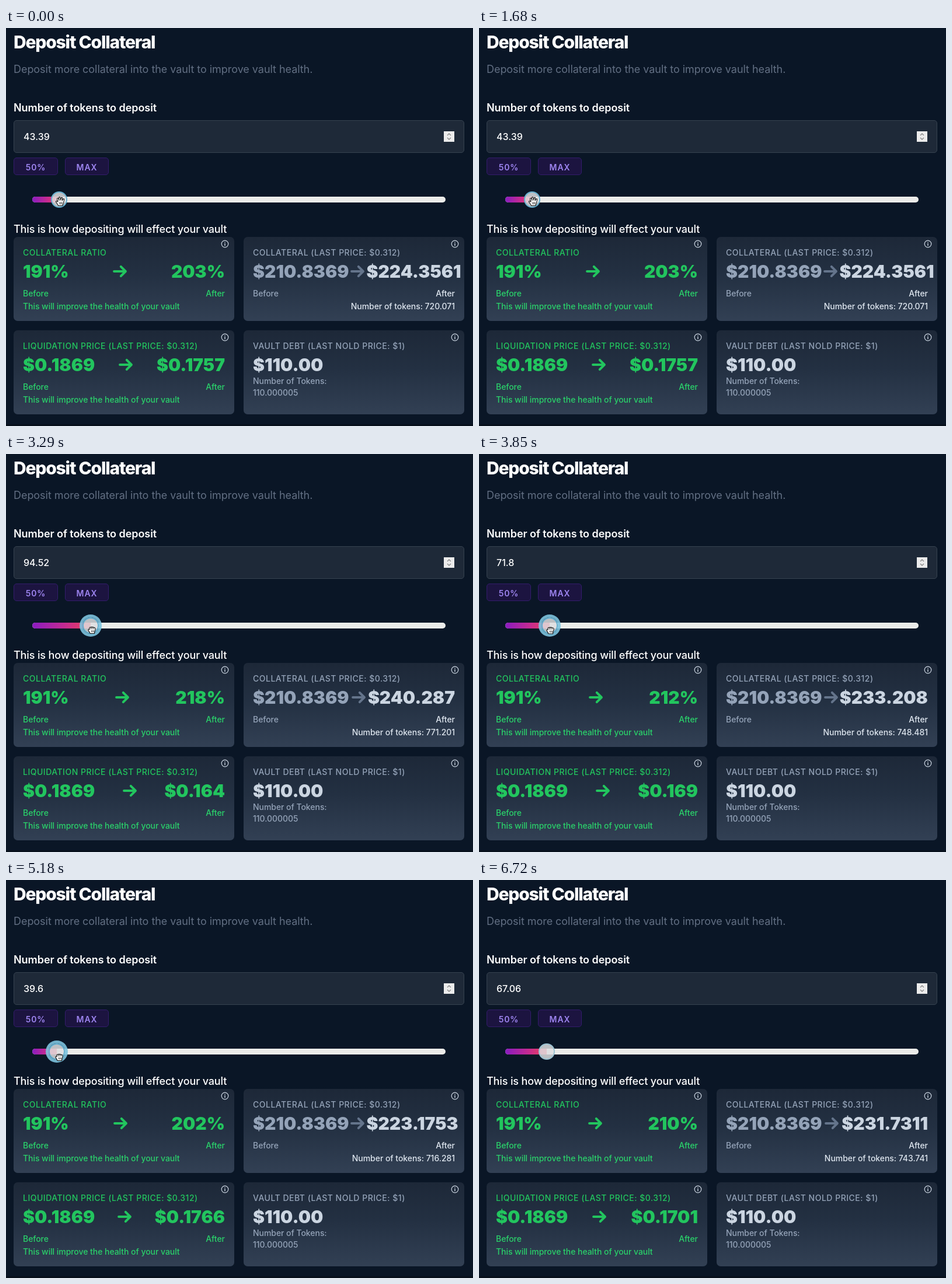
An HTML page for the animation above (6.79 s loop, 800 px wide and 682 px high).

```html
<!DOCTYPE html>
<html lang="en">
<head>
<meta charset="utf-8">
<title>Deposit Collateral</title>
<style>
html, body { margin: 0; width: 100%; height: 100%; overflow: hidden; background: #0a1626; }
#stage {
  position: relative; width: 800px; height: 682px; overflow: hidden; background: #0a1626;
  font-family: Inter, "Liberation Sans", sans-serif; font-optical-sizing: none;
  color: #fff; white-space: nowrap; cursor: default;
}
#stage::after { content: ""; position: absolute; left: 0; right: 0; bottom: 0; height: 3px; background: #07101c; }
.abs, .card > *, .thumb, .cursor { position: absolute; }
.abs { left: 13px; line-height: 28px; }
h1.abs { margin: 0; top: 9.5px; font-size: 30px; font-weight: 800; letter-spacing: -1.2px; }
.sub { top: 57px; font-size: 18px; letter-spacing: -.045px; color: #626f83; }
.label { font-size: 18px; font-weight: 500; letter-spacing: -.13px; }
.input {
  top: 158px; width: 772px; height: 56px; box-sizing: border-box; line-height: 54px; padding-left: 16px;
  background: #1e2938; border: 1px solid #36424f; border-radius: 5px; font-size: 16px; font-weight: 500;
}
.input svg { position: absolute; left: 736px; top: 18px; }
.btn {
  top: 222px; height: 30px; line-height: 31px; box-sizing: border-box; text-align: center;
  font-size: 14px; font-weight: 600; letter-spacing: .9px; color: #9f86f2;
  background: #1c1440; border: 1px solid #331c6c; border-radius: 5px;
}
.btn b { font-weight: inherit; position: relative; top: -.5px; }
.track { left: 45px; top: 289px; width: 708px; height: 10px; border-radius: 5px; background: #ebebe9; overflow: hidden; }
.fill { height: 100%; background: linear-gradient(90deg, #8a1cc0, #c42a92 55%, #ee4258); }
.thumb {
  top: 280px; left: -14px; width: 28px; height: 28px; box-sizing: border-box; border-radius: 50%;
  border: 2px solid #66b0d0; background: rgba(222, 222, 225, .85);
}
.thumb.held { box-shadow: 0 0 0 5px rgba(126, 196, 222, .9); }
.thumb.idle { border-color: #9cc3d2; }
.card {
  position: absolute; width: 378px; height: 144px; border-radius: 7px;
  background: linear-gradient(#1d2838, #233042 45%, #324054); color: #22c55e;
}
.card > * { line-height: 20px; font-size: 14px; font-weight: 500; letter-spacing: -.05px; left: 16px; }
.card .title { top: 17px; letter-spacing: .5px; }
.card .values {
  top: 44px; right: 16px; height: 30px; display: flex; justify-content: space-between; align-items: center;
  font-size: 30px; font-weight: 900; letter-spacing: 0;
}
.values > * { flex: none; }
.card .before { top: 87px; }
.card .after { top: 87px; left: auto; right: 16px; }
.card .note { top: 109px; }
.card .info { left: 355px; top: 5px; color: #cbd5e1; }
.green .before, .green .after, .green .note { color: #2ad06a; }
.gray { color: #94a3b8; }
.gray .arrow { color: #64748b; }
.gray .new { color: #cbd5e1; }
.gray .after { color: #dde5ee; }
.cursor { left: 0; top: 0; overflow: visible; }
</style>
</head>
<body>
<div id="stage">
  <h1 class="abs">Deposit Collateral</h1>
  <div class="abs sub">Deposit more collateral into the vault to improve vault health.</div>
  <div class="abs label" style="top:123px;font-weight:600;letter-spacing:-.06px">Number of tokens to deposit</div>
  <div class="abs input"><span id="amount"></span>
    <svg width="18" height="18" fill="none" stroke="#8a8a8a" stroke-width="1.4">
      <rect width="18" height="18" fill="#ececec" stroke="none"/>
      <path d="M6 7l3-3 3 3M6 11l3 3 3-3"/>
    </svg>
  </div>
  <div class="abs btn" style="width:76px"><b>50%</b></div>
  <div class="abs btn" style="left:101px;width:75px"><b>MAX</b></div>
  <div class="abs track"><div class="fill" id="fill"></div></div>
  <div class="thumb" id="thumb"></div>
  <div class="abs label" style="top:331px">This is how depositing will effect your vault</div>

  <div class="card green" style="left:13px;top:358px">
    <div class="title">COLLATERAL RATIO</div>
    <div class="values"><span>191%</span><i class="arrow"></i><span id="ratio"></span></div>
    <div class="before">Before</div><div class="after">After</div>
    <div class="note">This will improve the health of your vault</div>
  </div>
  <div class="card gray" style="left:407px;top:358px">
    <div class="title">COLLATERAL (LAST PRICE: $0.312)</div>
    <div class="values"><span>$210.8369</span><i class="arrow"></i><span class="new" id="worth"></span></div>
    <div class="before">Before</div><div class="after">After</div>
    <div class="after" style="top:109px">Number of tokens: <span id="tokens"></span></div>
  </div>
  <div class="card green" style="left:13px;top:518px">
    <div class="title">LIQUIDATION PRICE (LAST PRICE: $0.312)</div>
    <div class="values"><span>$0.1869</span><i class="arrow"></i><span id="liquid"></span></div>
    <div class="before">Before</div><div class="after">After</div>
    <div class="note">This will improve the health of your vault</div>
  </div>
  <div class="card gray" style="left:407px;top:518px">
    <div class="title">VAULT DEBT (LAST NOLD PRICE: $1)</div>
    <div class="values"><span class="new">$110.00</span></div>
    <div class="before" style="top:77px">Number of Tokens:</div>
    <div class="before" style="top:97px">110.000005</div>
  </div>

  <svg class="cursor" id="cursor" width="1" height="1" stroke-linejoin="round" stroke-linecap="round">
    <g id="open" fill="#fff" stroke="#111" stroke-width="1.1">
      <path d="M-3.5 7.5C-4 5-7 2.5-7.5.5C-7.5-1-5.5-1-4 1L-5.5-4C-5.5-6-3.5-6-3-4.5L-2-1.5L-2.5-6C-2-7.8-.3-7.8 0-6L.5-2L1.5-5.8C2-7.2 3.7-6.8 3.5-5.2L3.2-1.2L4.7-3.8C5.5-5 7-4.2 6.5-2.5L5.5 2.5C5 5 4 6 4 7.5Z"/>
      <path d="M-1 1.5V5M1 1.5V5M3 1.5V5" stroke-width=".8"/>
    </g>
    <g id="closed" fill="#fff" stroke="#111" stroke-width="1.1">
      <path d="M-3.5 6.5C-4 4-6.5 2.5-6.5.5C-6.5-1-5-1-4.5-.2V-3C-4-4.7-2.5-4.5-2-3.5C-1.5-5-.3-5 .3-3.7C1-4.9 2.3-4.5 2.7-3.3C3.5-4.2 5.5-3.7 5.5-1.5C5.5 2.5 4 4 4 6.5Z"/>
      <path d="M-2-3V-1M.3-3V-1M2.7-2.8V-1M-1 1.5V4M1 1.5V4M3 1.5V4" stroke-width=".8"/>
    </g>
    <path id="pointer" d="M0 0V14L3.3 11L5.6 16.3L8 15.2L5.8 10.2H10.2Z" fill="#111" stroke="#fff" stroke-width="1.1"/>
  </svg>
</div>
<script>
const LOOP = 6790, STEP = 70;
const PRESS = 1890, RELEASE = 5810, LEAVE = 6510;
const $ = id => document.getElementById(id);

const icon = (size, view, body) =>
  `<svg width="${size}" height="${size}" viewBox="0 0 ${view} ${view}" fill="none" stroke="currentColor"
    stroke-linecap="round" stroke-linejoin="round" style="display:block">${body}</svg>`;
document.querySelectorAll('.arrow').forEach(el => {
  el.innerHTML = icon(30, 20, '<path d="M3.4 10H16.4M11.2 4.6l5.4 5.4-5.4 5.4" stroke-width="2.7"/>');
});
document.querySelectorAll('.card').forEach(card => {
  const el = document.createElement('div');
  el.className = 'info';
  el.innerHTML = icon(14, 14, '<circle cx="7" cy="7" r="5.8" stroke-width="1.2"/><path d="M7 6.5V9.7M7 4.3V4.4" stroke-width="1.4"/>');
  card.append(el);
});

// Each key: time, thumb x, pointer x, pointer y
const keys = [
  [0, 91, 93, 297], [1960, 91, 93, 297], [3220, 145, 147.5, 301], [3430, 145, 147.5, 301],
  [4270, 96, 97.5, 302], [5180, 87, 91.5, 303], [5740, 116, 119, 303], [RELEASE, 116, 119, 303],
  [6020, 116, 130, 315], [6160, 116, 130, 315], [LEAVE, 116, 230, 700], [LOOP, 116, 230, 700]
];

function pose(t) {
  const i = keys.findIndex(k => k[0] > t);
  const a = keys[i - 1], b = keys[i];
  const p = (t - a[0]) / (b[0] - a[0]);
  const e = p * p * (3 - 2 * p);
  return a.map((v, n) => v + (b[n] - v) * e);
}

const trim = (n, digits) => String(+n.toFixed(digits));
const show = (id, on) => { $(id).style.display = on ? '' : 'none'; };

function render(t) {
  const [, thumbX, x, y] = pose(t);
  const px = Math.round(thumbX);
  const amount = +(43.39 + .94685 * (px - 91)).toFixed(2);
  const tokens = 676.681 + amount;
  const worth = tokens * .311575;

  $('amount').textContent = trim(amount, 2);
  $('ratio').textContent = Math.floor(worth / 1.1) + '%';
  $('worth').textContent = '$' + trim(worth, 4);
  $('tokens').textContent = trim(tokens, 3);
  $('liquid').textContent = '$' + trim(126.5 / tokens, 4);

  const held = t >= PRESS && t < RELEASE;
  $('fill').style.width = px - 45 + 'px';
  $('thumb').style.transform = `translateX(${px}px)`;
  $('thumb').className = 'thumb' + (held ? ' held' : t >= 6300 ? ' idle' : '');

  $('cursor').style.transform = `translate(${x}px, ${y}px)`;
  show('open', t < PRESS);
  show('closed', held);
  show('pointer', t >= RELEASE && t < LEAVE);
}

const start = performance.now();
function tick() {
  const t = (performance.now() - start) % LOOP;
  render(Math.floor(t / STEP) * STEP);
  requestAnimationFrame(tick);
}
tick();
</script>
</body>
</html>
```
